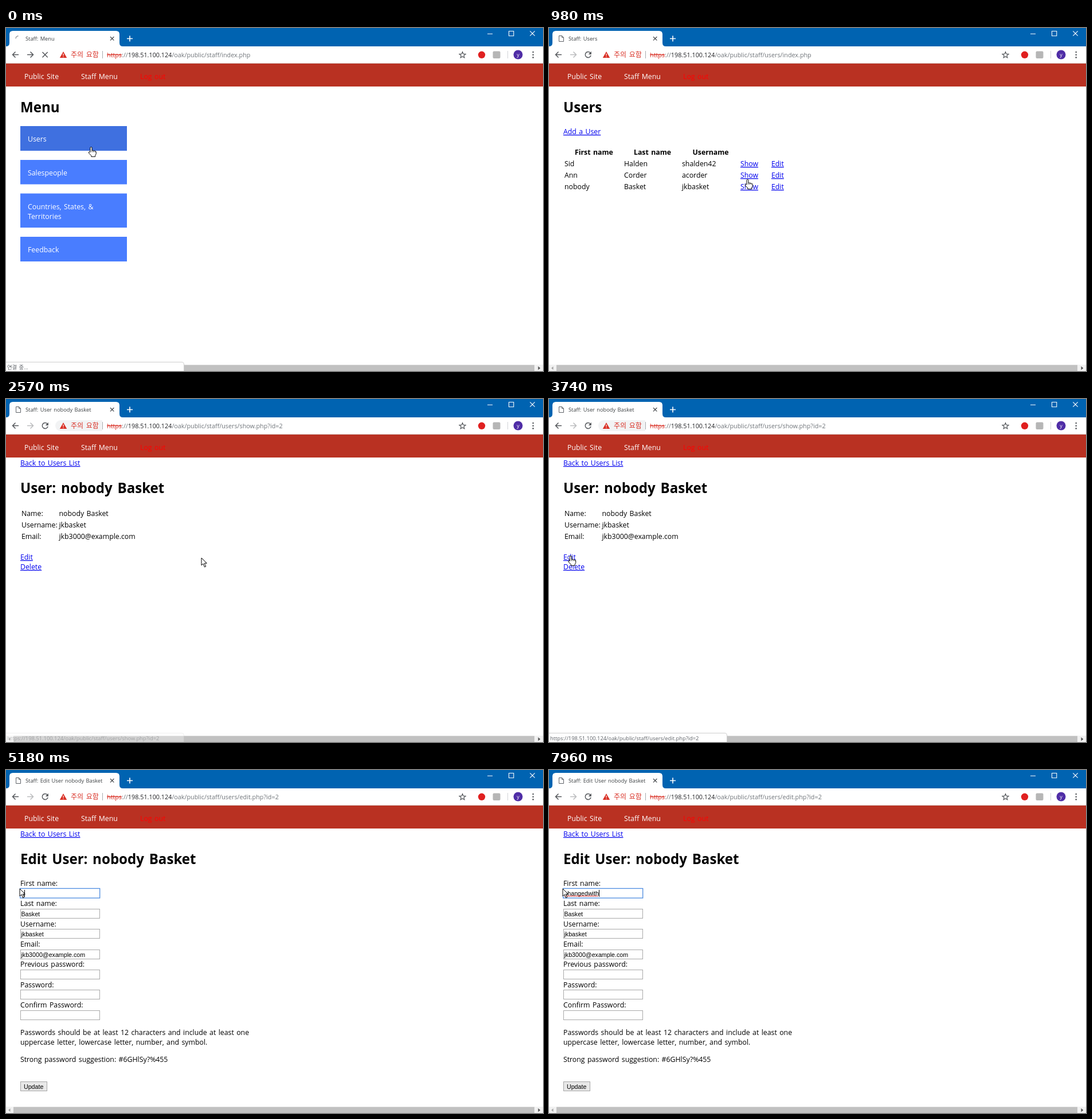
These frames come from a looping animation (937x598 px, 8 s). An HTML page:

```html
<!DOCTYPE html>
<html lang="ko">
<head>
<meta charset="utf-8">
<title>Staff pages</title>
<style>
  html, body { margin: 0; width: 100%; height: 100%; overflow: hidden; background: #fff; }
  svg { display: block; }
  text { font: 12.3px 'Open Sans', 'Noto Sans', sans-serif; word-spacing: .1em; fill: #000; white-space: pre; }
  .h1 { font-size: 24.1px; font-weight: 700; }
  .th { font-weight: 700; }
  .link { fill: #00e; text-decoration: underline; }
  .light { fill: #fff; }
  .out { fill: #f00; }
  .tab { font-size: 9.3px; fill: #3c4043; }
  .url { font-size: 10.8px; fill: #70757a; }
  .host { fill: #202124; }
  .struck { fill: #d93025; text-decoration: line-through; }
  .warn { font: 12px 'Noto Sans CJK KR', 'Noto Sans CJK JP', 'Noto Sans CJK', sans-serif; fill: #d93025; }
  .status { font: 9.35px 'Open Sans', 'Noto Sans CJK KR', 'Noto Sans CJK JP', sans-serif; fill: #5f6368; }
  .field { font: 10.67px 'Liberation Sans', Arial, sans-serif; word-spacing: 0; }
  .icon { fill: none; stroke: #55585c; stroke-width: 1.5; }
</style>
</head>
<body>
<svg id="stage" width="937" height="598" viewBox="0 0 937 598"></svg>
<script>
const HOST = '198.51.100.124', ROOT = '/oak/public/staff/';
const NAME = 'nobody Basket', LOGIN = 'jkbasket', MAIL = 'jkb3000@example.com';
const CONNECTING = '연결 중...';
const FIELD_X = 27;

const text = (x, y, str, cls = '') => `<text x="${x}" y="${y}" class="${cls}">${str}</text>`;
const rect = (x, y, w, h, fill, extra = '') =>
  `<rect x="${x}" y="${y}" width="${w}" height="${h}" fill="${fill}" ${extra}/>`;
const path = (d, extra = 'class="icon"') => `<path d="${d}" ${extra}/>`;
const circle = (x, y, r, fill) => `<circle cx="${x}" cy="${y}" r="${r}" fill="${fill}"/>`;
const group = (id, body = '', extra = '') => `<g id="${id}" ${extra}>${body}</g>`;

function menuPage() {
  const button = (y, h, lines, fill = '#497dff') => rect(25, y, 186, h, fill) +
    lines.map((line, i) => text(38, y + 27 + i * 17, line, 'light')).join('');
  return text(25, 147, 'Menu', 'h1') +
    button(171, 43, ['Users'], '#3f70e0') +
    button(230, 42.5, ['Salespeople']) +
    button(288.5, 59.5, ['Countries, States, &amp;', 'Territories']) +
    button(364, 43, ['Feedback']);
}

function usersPage() {
  const people = [
    ['Sid', 'Halden', 'shalden42'],
    ['Ann', 'Corder', 'acorder'],
    [...NAME.split(' '), LOGIN],
  ];
  const cols = [27, 131, 232];
  return text(25, 147, 'Users', 'h1') + text(25, 185, 'Add a User', 'link') +
    text(45, 221, 'First name', 'th') + text(148, 221, 'Last name', 'th') +
    text(250.5, 221, 'Username', 'th') +
    people.map((row, i) => {
      const y = 241 + i * 20;
      return row.map((cell, c) => text(cols[c], y, cell)).join('') +
        text(334, y, 'Show', 'link') + text(388, y, 'Edit', 'link');
    }).join('');
}

const backLink = text(25, 116, 'Back to Users List', 'link');

function showPage() {
  const rows = [['Name:', NAME], ['Username:', LOGIN], ['Email:', MAIL]];
  return backLink + text(25, 164, 'User: ' + NAME, 'h1') +
    rows.map(([k, v], i) => text(27, 204 + i * 20, k) + text(92.5, 204 + i * 20, v)).join('') +
    text(25, 280, 'Edit', 'link') + text(25, 297, 'Delete', 'link');
}

function editPage() {
  const fields = [['First name:', ''], ['Last name:', NAME.split(' ')[1]], ['Username:', LOGIN],
    ['Email:', MAIL], ['Previous password:', ''], ['Password:', ''], ['Confirm Password:', '']];
  return backLink + text(25, 164, 'Edit User: ' + NAME, 'h1') +
    fields.map(([label, value], i) => {
      const top = Math.ceil(206 + i * 35.35) + .5;
      return text(25, Math.round(202 + i * 35.35), label) +
        rect(25.5, top, 138, 16, '#fff', 'stroke="#a9a9a9"') +
        text(FIELD_X - .5, top + 12, value, 'field');
    }).join('') +
    text(25, 462, 'Passwords should be at least 12 characters and include at least one') +
    text(25, 479, 'uppercase letter, lowercase letter, number, and symbol.') +
    text(25, 509, 'Strong password suggestion: #6GHlSy?%455') +
    rect(25.5, 543.5, 46, 16, '#e8e8e8', 'stroke="#a6a6a6"') +
    text(31, 555.5, 'Update', 'field') + group('entry');
}

const pages = {
  menu: { title: 'Menu', file: 'index.php', body: menuPage() },
  users: { title: 'Users', file: 'users/index.php', body: usersPage() },
  show: { title: 'User ' + NAME, file: 'users/show.php?id=2', body: showPage() },
  edit: { title: 'Edit User ' + NAME, file: 'users/edit.php?id=2', body: editPage() },
};
const address = page => 'https://' + HOST + ROOT + pages[page].file;

const outline = 'fill="#fff" stroke="#000" stroke-linejoin="round"';
const cursors = {
  arrow: path('M.5 .5V13.5L3.5 10.6 6 16.5 8.2 15.5 5.7 9.8H9.8Z', outline),
  hand: path('M-1.5 9V1.5a1.5 1.5 0 0 1 3 0V6.3l1.5-.5 1.2 .9 1.7-.3 1 .9 1.2 .1 .6 .9V12L7.2 14.8V16.8H.3V15L-4 10.5V8.7L-2.8 8.2Z', outline) +
    path('M1.5 6.3V9M4.2 6.7V9M6.9 7.3V9', 'stroke="#000" stroke-width=".8"'),
  beam: path('M-2.5 -6.5H2.5M-2.5 6.5H2.5M0 -6.5V6.5', 'stroke="#000"'),
};

const star = Array.from({ length: 10 }, (_, i) => {
  const a = i * Math.PI / 5 - Math.PI / 2, r = i % 2 ? 2.5 : 5.7;
  return (796.5 + r * Math.cos(a)).toFixed(2) + ' ' + (47.2 + r * Math.sin(a)).toFixed(2);
}).join('L');

const white = 'fill="none" stroke="#fff" stroke-width="1.1"';
const frame =
  rect(0, 0, 937, 32, '#0063b1') +
  path('M0 32Q6 32 6 26V11Q6 5 12 5H192Q198 5 198 11V26Q198 32 204 32Z', 'fill="#fff"') +
  path('M182 15.2L188.4 21.6M188.4 15.2L182 21.6', 'stroke="#4a4d50" stroke-width="1.3"') +
  path('M211 18.5H221M216 13.5V23.5', 'stroke="#fff" stroke-width="1.6"') +
  path('M840 10.3H849M877.5 5.5H885.8V13.8H877.5ZM914.3 5.3L922.7 13.7M922.7 5.3L914.3 13.7', white) +
  rect(0, 32, 937, 30, '#fff') + group('chip') +
  path('M22 46.5H11.8M16.5 41.5L11.5 46.5L16.5 51.5') +
  group('forward', path('M37 46.5H47.2M42.5 41.5L47.5 46.5L42.5 51.5')) +
  group('reload') +
  path('M100 41L106.2 52H93.8Z', 'fill="#d93025"') +
  path('M100 44.6V48.2M100 49.4V50.7', 'stroke="#fff" stroke-width="1.2"') +
  text(113, 51, '주의 요함', 'warn') +
  rect(168, 40, 1, 13, '#a8abae') + group('bar') +
  path('M' + star + 'Z', 'fill="none" stroke="#55585c" stroke-width="1.2"') +
  circle(830, 46.8, 6.2, '#e02020') +
  rect(849.5, 40.5, 13, 12.5, '#b6b6b6', 'rx="2"') +
  rect(875, 40, 1, 13, '#d2d4d7') +
  circle(893.5, 46.5, 8, '#4f2da6') +
  `<text x="893.5" y="49.5" text-anchor="middle" style="font-size:9px;fill:#fff">y</text>` +
  [42, 46.7, 51.4].map(y => circle(919.7, y, 1.3, '#55585c')).join('') +
  rect(0, 61, 937, 1, '#dcd2d0') +
  rect(0, 62, 937, 40, '#b93122') +
  text(32, 89, 'Public Site', 'light') + text(131, 89, 'Staff Menu', 'light') + text(234, 89, 'Log out', 'out');

const scrollbar = rect(0, 587, 937, 11, '#f1f1f1') + rect(13, 587.5, 909, 10.5, '#c1c1c1') +
  path('M7.5 590L4 593L7.5 596Z', 'fill="#a3a3a3"') + path('M928.5 589.7L932.3 593L928.5 596.3Z', 'fill="#505050"');

const bubble = path('M-1 582.5H307Q310.5 582.5 310.5 586V599H-1Z', 'fill="#fff" stroke="#cfcfcf"') +
  '<text id="note" x="2" y="594.5" class="status"></text>';

const stage = document.getElementById('stage');
stage.innerHTML = frame + group('tab') + group('page') + scrollbar + group('status', bubble) + group('cursor');
const $ = id => document.getElementById(id);

// Each step lists only what changes at that time.
const start = { page: 'menu', loading: true, cursor: 'hand', x: 148.5, y: 207.5, note: CONNECTING, alpha: 1,
  typed: 'nobody', focus: false, selected: false, caret: false, wavy: false };
const move = (time, x, y, more) => [time, { x, y, ...more }];
const steps = [
  [0, {}],
  [150, { page: 'users', loading: false }],
  move(430, 168, 213, { cursor: 'arrow' }),
  move(610, 252, 236, { alpha: .5 }),
  move(800, 370, 260, { alpha: 0 }),
  move(980, 346.5, 264, { cursor: 'hand' }),
  move(1100, 348, 268),
  move(1230, 351, 274),
  move(1370, 354, 278),
  move(1520, 354.5, 279),
  [1660, { note: address('show'), alpha: .25 }],
  [1790, { alpha: .5 }],
  [1930, { alpha: 1 }],
  [2070, { loading: true, note: CONNECTING }],
  [2200, { page: 'show', loading: false, note: address('show') }],
  move(2570, 340.5, 276.5, { cursor: 'arrow', alpha: .32 }),
  move(2700, 318, 272, { alpha: 0 }),
  move(2830, 270, 264),
  move(2960, 208, 258),
  move(3090, 144, 257),
  move(3220, 92, 261),
  move(3350, 56, 267),
  move(3480, 40, 272, { cursor: 'hand' }),
  move(3620, 38, 273.5, { note: address('edit'), alpha: .5 }),
  [3740, { alpha: 1 }],
  [4020, { loading: true, note: CONNECTING }],
  [4160, { page: 'edit', loading: false, alpha: .4 }],
  move(4300, 54, 240, { cursor: 'arrow', alpha: 0 }),
  move(4440, 63, 215, { cursor: 'beam', focus: true }),
  move(4580, 28, 215, { selected: true }),
  move(4870, 23.5, 206.5, { cursor: 'arrow' }),
  [5180, { selected: false, caret: true, typed: 'c' }],
];
[...'hangedw'].forEach((_, i) =>
  steps.push([5650 + Math.round(i * 910 / 6), { typed: 'changedw'.slice(0, i + 2) }]));
steps.push(
  [6700, { typed: 'changedwi' }],
  [6830, { typed: 'changedwith' }],
  [7410, { caret: false }],
  [7840, { wavy: true }],
  [7960, { caret: true }],
);
let last = start;
const states = steps.map(([, change]) => last = { ...last, ...change });

function drawTab(s) {
  const icon = s.loading
    ? path('M17 18.5Q17.2 14.6 21.5 13.8', 'fill="none" stroke="#9a9da1" stroke-width="1.4"')
    : path('M17.5 13.5H22.5L25.5 16.5V23.5H17.5ZM22.5 13.5V16.5H25.5', 'fill="none" stroke="#5f6368"');
  $('tab').innerHTML = icon + text(34, 22, 'Staff: ' + pages[s.page].title, 'tab');
  $('bar').innerHTML = `<text x="176" y="50.8" class="url"><tspan class="struck">https</tspan>://` +
    `<tspan class="host">${HOST}</tspan>${ROOT}${pages[s.page].file}</text>`;
  $('reload').innerHTML = s.loading
    ? path('M63.5 42L72.7 51.2M72.7 42L63.5 51.2')
    : path('M72 43.2A5 5 0 1 0 73.1 47.8') + path('M73.9 40.8V46H68.7Z', 'fill="#55585c"');
  $('forward').setAttribute('opacity', s.page === 'menu' ? 1 : .4);
  $('chip').innerHTML = s.page === 'show' ? path('M168 37H95.5a9.5 9.5 0 0 0 0 19H168Z', 'fill="#f2f3f4"') : '';
}

function drawEntry(s) {
  const entry = $('entry');
  entry.innerHTML = text(FIELD_X, 219, s.typed, 'field');
  const label = entry.firstChild, width = label.getComputedTextLength(), end = FIELD_X + width;
  let under = '', over = '';
  if (s.focus) under += rect(24.7, 206.5, 139, 16.7, '#fff', 'stroke="#4d8ce0" stroke-width="1.3"');
  if (s.selected) {
    under += rect(FIELD_X, 209, width, 12, '#3297fd');
    label.style.fill = '#fff';
  }
  if (s.wavy) {
    let d = `M${FIELD_X} 220.5`;
    for (let x = FIELD_X + 1.5, i = 0; x < end; x += 1.5, i++) d += `L${x} ${i % 2 ? 220.5 : 219.3}`;
    over += path(d, 'fill="none" stroke="#f11"');
  }
  if (s.caret) over += rect(Math.round(end), 209, 1, 12, '#000');
  label.insertAdjacentHTML('beforebegin', under);
  label.insertAdjacentHTML('afterend', over);
}

function draw(s) {
  drawTab(s);
  $('page').innerHTML = pages[s.page].body;
  if (s.page === 'edit') drawEntry(s);
  $('status').setAttribute('opacity', s.alpha);
  $('note').textContent = s.note;
  $('cursor').innerHTML = cursors[s.cursor];
  $('cursor').setAttribute('transform', `translate(${s.x} ${s.y})`);
}

let shown = -1;
function tick() {
  const time = performance.now() % 8000;
  const index = steps.findLastIndex(([at]) => at <= time);
  if (index !== shown) draw(states[shown = index]);
  requestAnimationFrame(tick);
}
tick();
</script>
</body>
</html>
```
